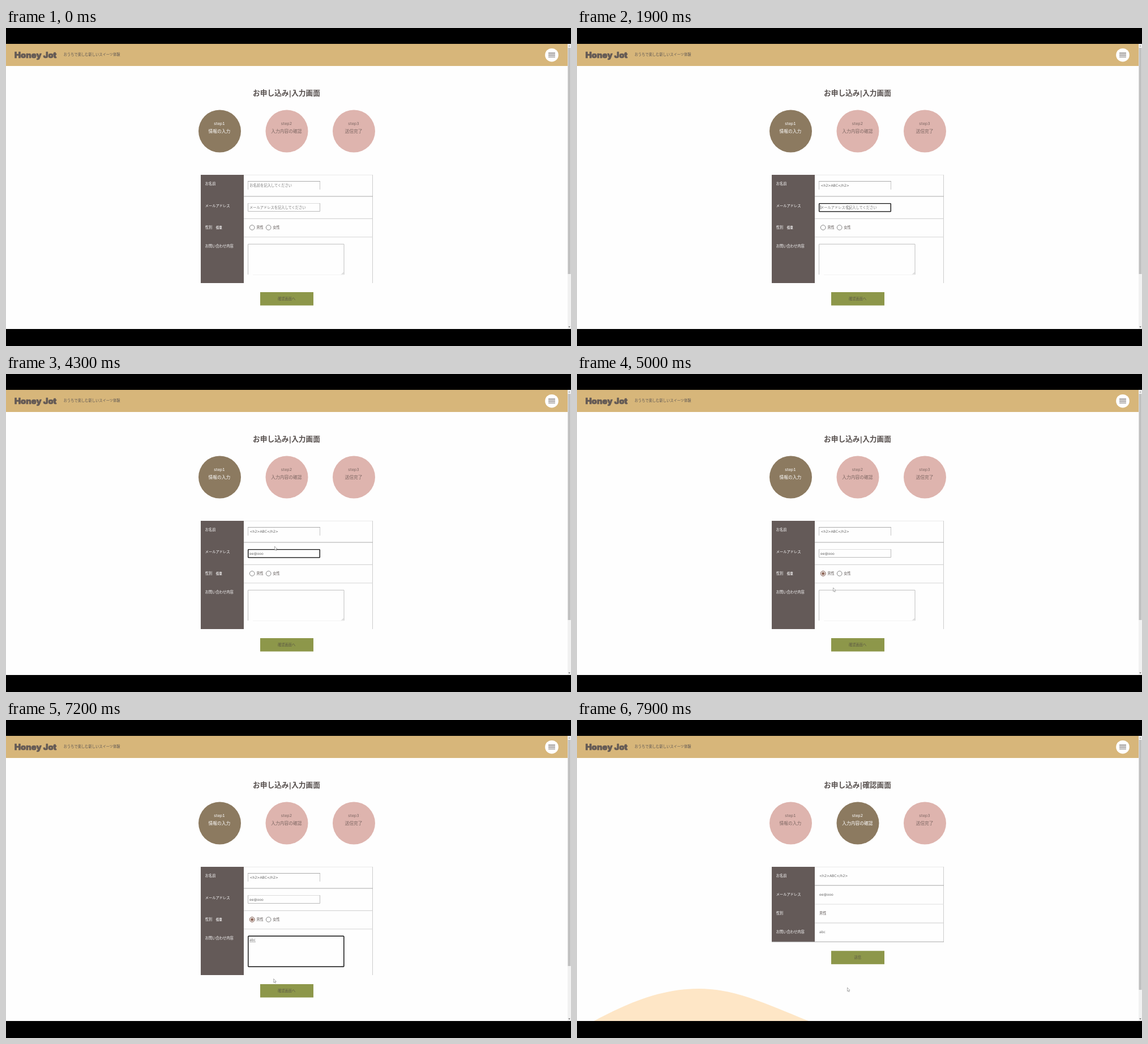
Write an HTML page that moves like this. It is 998 by 561 pixels and loops after 8 s.

```html
<!DOCTYPE html>
<html lang="ja">
<head>
<meta charset="utf-8">
<title>お申し込み</title>
<style>
  html, body { margin: 0; width: 100%; height: 100%; overflow: hidden; background: #000; }
  svg { display: block; width: 100vw; height: 100vh; }
  text { font: 6.25px "DejaVu Sans", "Noto Sans CJK JP", "Noto Sans CJK", sans-serif; fill: #5d5654; white-space: pre; }
  .mid { text-anchor: middle; }
  .brand { font: 900 14.7px Inter, sans-serif; fill: #645a55; stroke: #645a55; stroke-width: .7; stroke-linejoin: round; }
  .title { font-size: 12.7px; font-weight: bold; fill: #57504e; }
  .step circle { fill: #deb4ae; }
  .step text { font-size: 7.75px; fill: #7c6662; }
  .step .num { font-size: 6.9px; }
  .step.on circle { fill: #8c7a60; }
  .step.on text { fill: #fff; }
  .label { fill: #fff; font-weight: 500; }
  .typed { font-size: 6.1px; fill: #666; }
  .hint { fill: #777; }
  .line { fill: none; stroke: #ccc; }
  .button rect { fill: #8d974a; }
  .button text { fill: #5d5a45; }
  .button.hover rect { fill: #f2bba2; }
  .button.hover text { fill: #fff; }
  .ring { fill: none; stroke: #111; stroke-width: 1.4; }
  .caret { stroke: #333; stroke-width: .7; }
</style>
</head>
<body>
<svg id="stage" viewBox="0 0 998 561" preserveAspectRatio="none"></svg>
<script>
const LOOP = 8000, TICK = 100, BLINK = 530, CONFIRM_AT = 7900;

const text = (x, y, s, cls = '') => `<text x="${x}" y="${y}" class="${cls}">${s}</text>`;
const rect = (x, y, w, h, fill) => `<rect x="${x}" y="${y}" width="${w}" height="${h}" fill="${fill}"/>`;
const line = (d, color = '#ccc') => `<path class="line" d="${d}" stroke="${color}" style="stroke:${color}"/>`;

const step = (i, name) => `<g class="step" id="step${i}">
  <circle cx="${259 + 118.5 * i}" cy="182" r="37.5"/>
  ${text(258.5 + 118.5 * i, 170.5, 'step' + i, 'mid num')}${text(258.5 + 118.5 * i, 185, name, 'mid')}</g>`;

const button = (id, y, name) => `<g class="button" id="${id}">
  ${rect(449, y, 94, 23.5, '')}${text(495.7, y + 13.8, name, 'mid')}</g>`;

const table = (bottom, rows) => rect(344, 259, 76, bottom - 259, '#645a58')
  + line(`M420 259.3H648`, '#eaeaea') + line(`M647.5 259V${bottom}`)
  + rows.map(([y, name]) => text(351.7, y, name, 'label')).join('');

const radio = (x, name) =>
  `<circle cx="${x}" cy="352" r="4.3" fill="#fff" stroke="#777" stroke-width=".9"/>${text(x + 7.6, 354.3, name)}`;

const fields = {
  name:  { x: 430.5, y: 280, box: [427.7, 270.6, 126.6, 14.3], hint: 'お名前を記入してください' },
  mail:  { x: 430, y: 318.7, box: [427.7, 309.6, 126.6, 14.3], hint: 'メールアドレスを記入してください' },
  notes: { x: 430, y: 390.3, box: [427.8, 381.3, 169, 54], hint: '' }
};
const field = ([id, f]) => {
  const [x, y, w, h] = f.box;
  return `<g id="${id}">${text(f.x, f.y, f.hint, 'hint')}${text(f.x, f.y, '', 'typed')}
    <path class="caret"/><rect class="ring" x="${x}" y="${y}" width="${w}" height="${h}" rx="1"/></g>`;
};

const stage = document.getElementById('stage');
stage.innerHTML = `
  ${rect(0, 0, 998, 561, '#000')}${rect(0, 28, 998, 503, '#fefefe')}
  ${rect(0, 28, 992, 39, '#d7b67a')}
  ${text(15, 53, 'Honey Jot', 'brand')}${text(101.7, 49.3, 'おうちで楽しむ新しいスイーツ体験')}
  <circle cx="964" cy="47.7" r="11.8" fill="#fff"/>
  <path d="M958 44.4H970M958 47.7H970M958 51H970" stroke="#5d5654" stroke-width="1.2"/>
  ${rect(992, 28, 6, 503, '#f1f1f1')}
  <rect id="thumb" x="992.5" y="35" width="5" fill="#c1c1c1"/>
  <path d="M993.3 32.5L995 30.5L996.7 32.5Z" fill="#999"/>
  <path d="M993.3 526.5L995 528.5L996.7 526.5Z" fill="#555"/>
  <text id="title" class="title mid" x="495.5" y="119.3"></text>
  ${step(1, '情報の入力')}${step(2, '入力内容の確認')}${step(3, '送信完了')}

  <g id="form">
    ${table(450, [[277, 'お名前'], [315.5, 'メールアドレス'], [354, '性別'], [387, 'お問い合わせ内容']])}
    <text class="label" x="370.7" y="354" style="font-size:5.5px;font-weight:bold">任意</text>
    ${line('M420 297H648', '#aaa')}${line('M420 336.3H648')}${line('M420 368.8H648', '#d4d4d4')}
    ${line('M427.5 285V270.5M554.5 270.5V285', '#c4c4c4')}${line('M427 270.5H555', '#aaa')}
    ${line('M427 309.5H555', '#ddd')}${line('M427.5 309V323.5H554.5V309', '#bbb')}
    ${line('M427.5 435V381.3H597V435', '#bfbfbf')}${line('M436 435.3H597', '#f2f2f2')}
    <path d="M593 434.5L596 431.5M595 434.5L596 433.5" stroke="#888" stroke-width=".6"/>
    ${radio(434.7, '男性')}${radio(463.7, '女性')}
    <g id="checked"><circle cx="434.7" cy="352" r="4.3" fill="#fff" stroke="#8e6759"/>
      <circle cx="434.7" cy="352" r="2.6" fill="#8e6759"/></g>
    ${Object.entries(fields).map(field).join('')}
    <path id="underline" d="M430 391.6H441" stroke="#777" stroke-width=".6"/>
    ${button('next', 466, '確認画面へ')}
  </g>

  <g id="confirm">
    <path d="M30 531C92 498 150 474 215 474S332 500 409 531Z" fill="#fee6c6"/>
    ${table(391.5, [[277, 'お名前'], [310, 'メールアドレス'], [343, '性別'], [376, 'お問い合わせ内容']])}
    ${line('M420 291.8H648', '#a4a4a4')}${line('M420 325H648', '#ddd')}${line('M420 358H648')}${line('M344 391.3H648', '#aaa')}
    ${text(428, 277, '&lt;h2&gt;ABC&lt;/h2&gt;', 'typed')}${text(428, 310, 'ee@ooo', 'typed')}
    ${text(428, 343.3, '男性')}${text(428, 376.3, 'abc', 'typed')}
    ${button('send', 407.3, '送信')}
  </g>

  <path id="arrow" d="M0 0V6.6L1.5 5.3L2.6 7.6L3.6 7.1L2.6 4.9H4.6Z" fill="#fff" stroke="#777" stroke-width=".6"/>
  <path id="hand" d="M0 0Q1-1 1.3 .4V2.6L4.2 3.3V5.5L3.3 7.5H.4L-1.8 4.3L-1 3.7L0 4.5Z" fill="#fff" stroke="#555" stroke-width=".6"/>`;

const get = id => document.getElementById(id);
const show = (node, on) => node.setAttribute('display', on ? 'inline' : 'none');

// Each entry: [start, value], holding until the next one.
const focusPlan = [[0, ''], [240, 'name'], [1900, 'mail'], [4750, ''], [5250, 'notes'], [7600, '']];
const typing = {
  name:  [[0, ''], [1500, '<h2>ABC</h2>']],
  mail:  [[0, ''], [2300, 'e'], [2750, 'ee'], [2950, 'ee@'], [3050, 'ee@o'], [3150, 'ee@oo'], [3250, 'ee@ooo']],
  notes: [[0, ''], [5650, 'a'], [5850, 'ab'], [6250, 'abc']]
};
const pointerPath = [[1900, 478, 313], [2100, 483.5, 305], [4100, 483.5, 305], [4300, 474.5, 304],
  [4600, 433, 350], [4800, 433, 350], [5200, 472, 404], [7000, 472, 404], [7300, 473, 475],
  [7800, 473, 475], [7900, 477.5, 472], [8000, 477.5, 472]];

const current = (plan, t) => plan.filter(([at]) => at <= t).pop();

function pointerAt(t) {
  const i = pointerPath.findIndex(([at]) => at > t);
  const [t0, x0, y0] = pointerPath[i - 1] || pointerPath[0];
  const [t1, x1, y1] = pointerPath[i];
  const k = Math.max(0, (t - t0) / (t1 - t0));
  const e = k * k * (3 - 2 * k);
  return [x0 + (x1 - x0) * e, y0 + (y1 - y0) * e];
}

function drawField(id, t, [focusAt, focused]) {
  const f = fields[id], node = get(id), [typedAt, value] = current(typing[id], t);
  const typed = node.querySelector('.typed'), caret = node.querySelector('.caret');
  typed.textContent = value;
  show(node.querySelector('.hint'), !value);
  show(node.querySelector('.ring'), focused === id);
  const idle = t - Math.max(typedAt, focusAt);
  show(caret, focused === id && idle % (2 * BLINK) < BLINK);
  const x = f.x + (value ? typed.getComputedTextLength() : 0) + .3;
  caret.setAttribute('d', `M${x} ${f.y - 6}v7.5`);
}

function draw(t) {
  const done = t >= CONFIRM_AT;
  show(get('form'), !done);
  show(get('confirm'), done);
  get('title').textContent = done ? 'お申し込み|確認画面' : 'お申し込み|入力画面';
  get('thumb').setAttribute('height', done ? 441 : 399);
  get('step1').classList.toggle('on', !done);
  get('step2').classList.toggle('on', done);

  const focus = current(focusPlan, t);
  Object.keys(fields).forEach(id => drawField(id, t, focus));
  show(get('checked'), t >= 4750);
  show(get('underline'), t >= 6250);

  const [x, y] = pointerAt(t);
  const hover = !done && y > 466;
  const visible = t >= 1900 && (t < 5300 || t >= 7000);
  get('next').classList.toggle('hover', hover);
  for (const id of ['arrow', 'hand']) {
    get(id).setAttribute('transform', `translate(${x} ${y})`);
    show(get(id), visible && (id === 'hand') === hover);
  }
}

const begin = performance.now();
function tick() {
  const t = Math.max(0, performance.now() - begin) % LOOP;
  draw(Math.floor(t / TICK) * TICK);
  requestAnimationFrame(tick);
}
tick();
</script>
</body>
</html>
```
